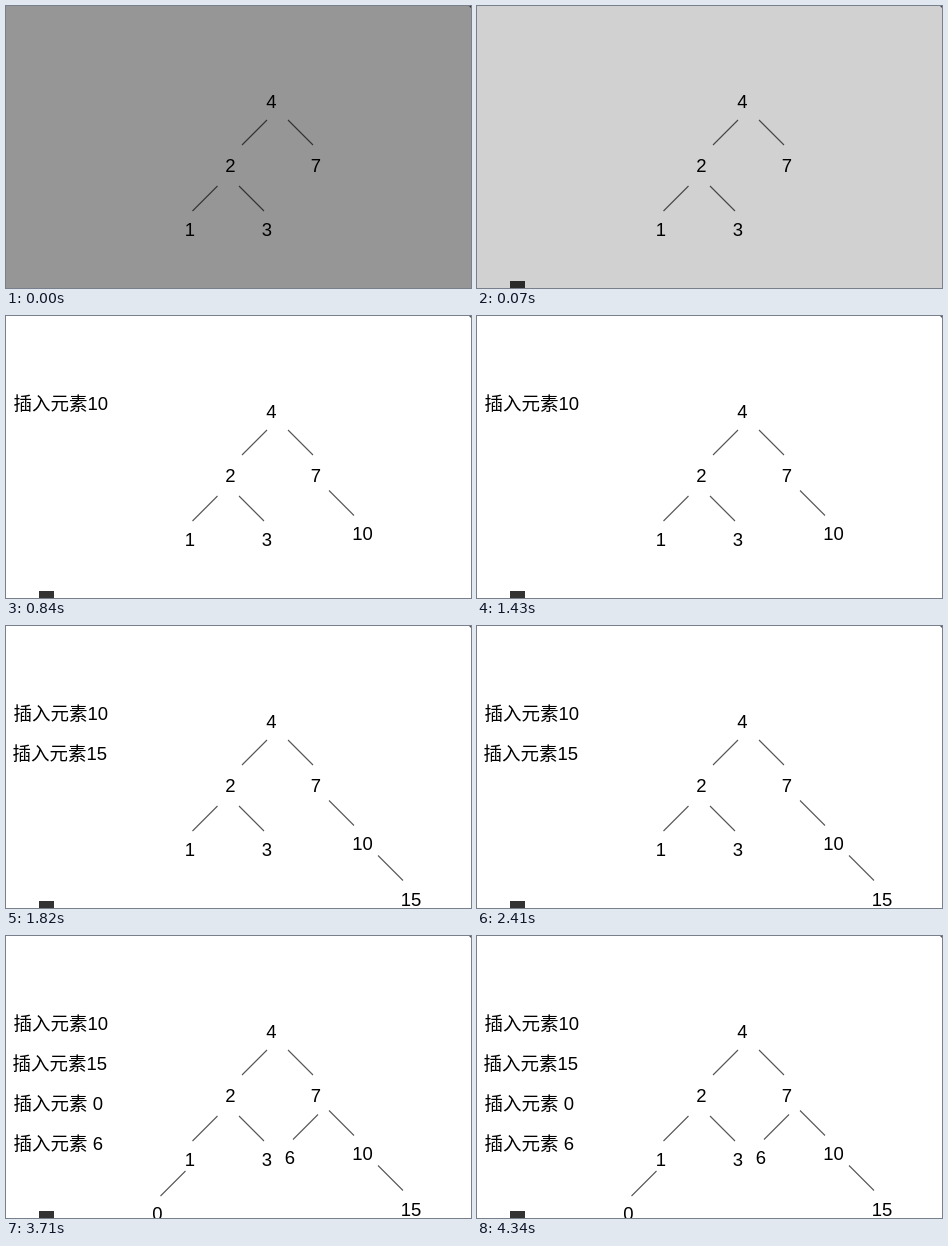
Animation, 465 px wide and 282 px high, one loop 4760 ms. Source, as an HTML page:

```html
<!DOCTYPE html>
<html lang="zh-CN">
<head>
<meta charset="utf-8">
<title>二叉搜索树插入</title>
<style>
html, body { margin: 0; width: 100%; height: 100%; overflow: hidden; background: #fff; }
svg { display: block; width: 465px; height: 282px; }
text { font: 18.5px "Liberation Sans", "Noto Sans CJK SC", "Noto Sans CJK", sans-serif; fill: #000; }
.node { text-anchor: middle; }
line { stroke: #555; stroke-width: 1.1; }
</style>
</head>
<body>
<svg id="stage" viewBox="0 0 465 282"></svg>
<script>
const LOOP = 4760;
const EDGE = 25;
const stage = document.getElementById("stage");

function add(tag, attrs, text = "", parent = stage) {
  const el = document.createElementNS("http://www.w3.org/2000/svg", tag);
  for (const key in attrs) el.setAttribute(key, attrs[key]);
  el.textContent = text;
  parent.append(el);
  return el;
}

// Holds each opacity from its time until the next one.
function hold(el, steps) {
  const frames = steps.map(([time, opacity]) =>
    ({ offset: time / LOOP, opacity, easing: "step-end" }));
  frames.push({ offset: 1, opacity: steps[steps.length - 1][1] });
  el.animate(frames, { duration: LOOP, iterations: Infinity });
}

const showAt = (el, time) => hold(el, [[0, 0], [time, 1]]);

function node(parent, value, x, baseline) {
  add("text", { class: "node", x, y: baseline }, value, parent);
}

// Every branch falls at 45 degrees; dir is -1 for left, 1 for right.
function branch(parent, x, y, dir) {
  add("line", { x1: x, y1: y, x2: x + dir * EDGE, y2: y + EDGE }, "", parent);
}

const tree = add("g", {});
[[4, 265.5, 102], [2, 224.5, 166.3], [7, 310, 166.3], [1, 184, 230.3], [3, 261, 230.3]]
  .forEach(item => node(tree, ...item));
[[261, 114, -1], [282, 114, 1], [211.5, 180, -1], [233, 180, 1]]
  .forEach(item => branch(tree, ...item));

const inserts = [
  { time: 840, label: "插入元素10", at: [7.5, 94], node: [10, 356.5, 224], branch: [323, 174.5, 1] },
  { time: 1820, label: "插入元素15", at: [6.5, 134], node: [15, 405, 280], branch: [372, 229.5, 1] },
  { time: 2800, label: "插入元素 0", at: [7.5, 174], node: [0, 151.5, 284.3], branch: [179.5, 235, -1] },
  { time: 3710, label: "插入元素 6", at: [7.5, 214], node: [6, 284, 228.3], branch: [312, 178.5, -1] }
];
for (const step of inserts) {
  const group = add("g", {});
  add("text", { x: step.at[0], y: step.at[1] }, step.label, group);
  node(group, ...step.node);
  branch(group, ...step.branch);
  showAt(group, step.time);
}

const badge = add("rect", { x: 33, y: 275, width: 15, height: 15, fill: "#333" });
showAt(badge, 70);
add("path", { d: "M463 0H465V2Z", fill: "#555" });

const shade = add("rect", { width: 465, height: 282, fill: "#000" });
hold(shade, [[0, 0.412], [70, 0.18], [140, 0]]);
</script>
</body>
</html>
```
